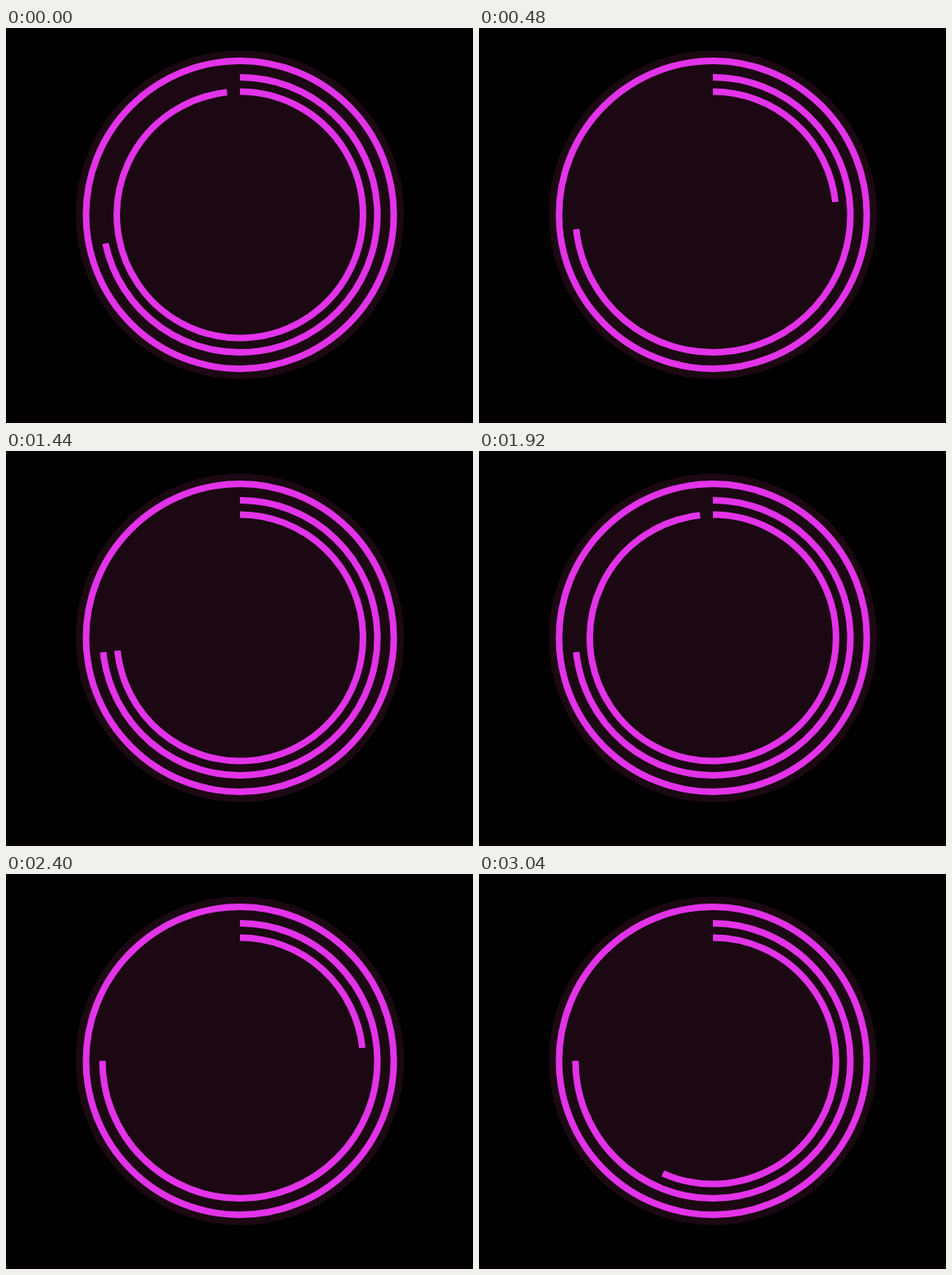
Recreate the animation shown at these times as an HTML page. Size 569 by 481 pixels, loop 3200 ms.

```html
<!DOCTYPE html>
<html lang="en">
<head>
<meta charset="utf-8">
<title>Ring clock</title>
<style>
  html, body { margin: 0; width: 100%; height: 100%; overflow: hidden; background: #000; }
  svg { display: block; }
  .ring { fill: none; stroke: #e233e9; stroke-width: 8; }
</style>
</head>
<body>
<svg width="569" height="481" viewBox="0 0 569 481">
  <rect width="569" height="481" fill="#000"/>
  <rect y="477" width="569" height="4" fill="#080205"/>
  <circle cx="285" cy="227.5" r="200" fill="#1b0812"/>
  <circle class="ring" cx="285" cy="227.5" r="187.5"/>
  <path class="ring" id="minutes"/>
  <path class="ring" id="seconds"/>
</svg>
<script>
  const CX = 285, CY = 227.5;
  const LOOP = 3200, TICK = 160, SECONDS_PER_TICK = 5;
  const START = 43 * 60 + 59;
  const minutes = document.getElementById('minutes');
  const seconds = document.getElementById('seconds');

  // Clockwise arc from twelve o'clock, value in sixtieths of a turn.
  function arc(r, value) {
    const a = value / 60 * 2 * Math.PI;
    const x = CX + r * Math.sin(a), y = CY - r * Math.cos(a);
    return `M${CX} ${CY - r}A${r} ${r} 0 ${value > 30 ? 1 : 0} 1 ${x} ${y}`;
  }

  function draw(ms) {
    const tick = Math.floor((ms % LOOP) / TICK);
    const clock = START + tick * SECONDS_PER_TICK;
    minutes.setAttribute('d', arc(167.5, Math.floor(clock / 60)));
    seconds.setAttribute('d', arc(150, clock % 60));
  }

  let origin = null;
  function loop(now) {
    if (origin === null) origin = now;
    draw(Math.max(0, now - origin));
    requestAnimationFrame(loop);
  }
  draw(0);
  requestAnimationFrame(loop);
</script>
</body>
</html>
```
